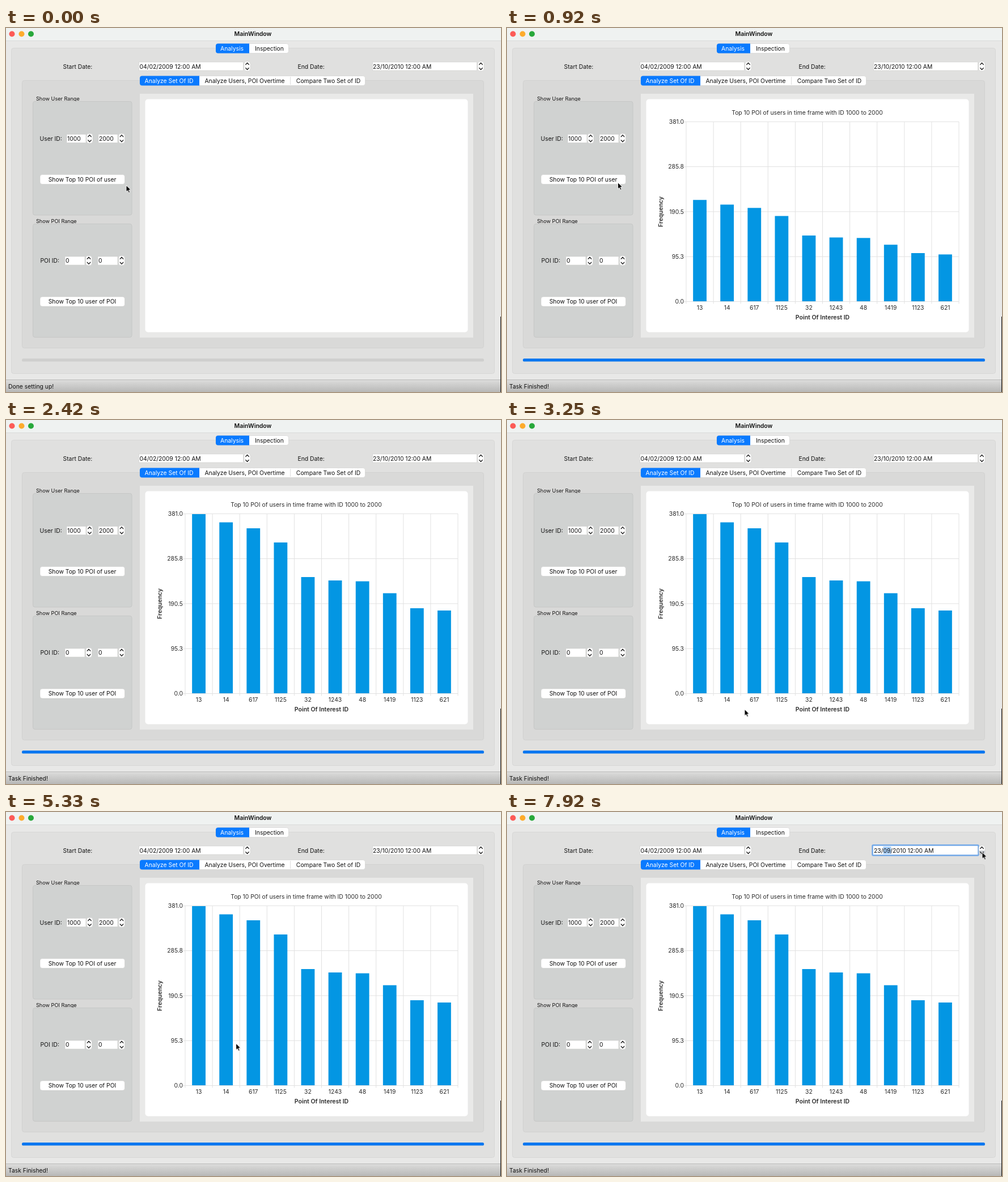
Write an HTML page that moves like this. It is 873 px wide and 642 px high and loops after 8000 ms.

```html
<!DOCTYPE html>
<html lang="en">
<head>
<meta charset="utf-8">
<title>MainWindow</title>
<style>
html, body { margin: 0; width: 100%; height: 100%; overflow: hidden; background: #e8e8e7; }
svg { display: block; width: 873px; height: 642px; }
text { font: 10.35px Inter, "Open Sans", sans-serif; fill: #111; white-space: pre; }
.bold { font-size: 10.5px; font-weight: 600; }
.small { font-size: 9.15px; }
.mid { text-anchor: middle; }
.end { text-anchor: end; }
.light { fill: #fff; }
.chart text { fill: #2b2b2b; }
.field { fill: #fff; stroke: #cbcbca; stroke-width: .6; }
.white { fill: #fff; stroke: #c4c4c3; stroke-width: .5; }
.blue { fill: #0a7aff; }
.group { fill: #d0d2d1; stroke: #c6c7c6; }
.bar { fill: #0396e3; }
.grid { stroke: #e1e1e1; fill: none; }
.chevron { fill: none; stroke: #222; stroke-width: 1.3; stroke-linecap: round; stroke-linejoin: round; }

/* Hard switches */
.idle, .work, .done, .press, .focus, .ibeam, .before, .after, .picked { animation: 8s step-end infinite; }
.idle { animation-name: idle; }
.work { animation-name: work; }
.done { animation-name: done; }
.press { animation-name: press; }
.focus { animation-name: focus; }
.ibeam { animation-name: ibeam; }
.before { animation-name: before; }
.after { animation-name: after; }
.picked { animation-name: picked; }
@keyframes idle { 0% { opacity: 1 } 5%, 100% { opacity: 0 } }
@keyframes work { 0% { opacity: 0 } 5% { opacity: 1 } 9.37%, 100% { opacity: 0 } }
@keyframes done { 0% { opacity: 0 } 9.37%, 100% { opacity: 1 } }
@keyframes press { 0% { opacity: 0 } 3.6% { opacity: 1 } 5.2%, 100% { opacity: 0 } }
@keyframes focus { 0% { opacity: 0 } 77%, 100% { opacity: 1 } }
@keyframes ibeam { 0% { opacity: 0 } 75% { opacity: 1 } 91.6%, 100% { opacity: 0 } }
@keyframes before { 0% { opacity: 1 } 98.95%, 100% { opacity: 0 } }
@keyframes after { 0% { opacity: 0 } 98.95%, 100% { opacity: 1 } }
@keyframes picked { 0% { opacity: 0 } 81.2% { opacity: 1 } 98.95%, 100% { opacity: 0 } }

/* Pointer paths */
.arrow { animation: arrow 8s linear infinite, arrowShown 8s step-end infinite; }
.beam { animation: beam 8s linear infinite; }
@keyframes arrowShown { 0% { opacity: 1 } 75% { opacity: 0 } 91.6%, 100% { opacity: 1 } }
@keyframes arrow {
  0%, 1% { transform: translate(211.5px, 277px) }
  3.5%, 12.5% { transform: translate(195px, 272px) }
  17.2%, 18% { transform: translate(381px, 182px) }
  19.7% { transform: translate(386px, 160px) }
  21.9%, 24% { transform: translate(400px, 95px) }
  26% { transform: translate(415px, -20px) }
  32.2% { transform: translate(560px, -20px) }
  32.25% { transform: translate(600px, 213px) }
  35.5% { transform: translate(724px, 400px) }
  37% { transform: translate(715px, 505px) }
  41.6% { transform: translate(340px, 511px) }
  44%, 51.5% { transform: translate(317px, 507px) }
  56%, 60.3% { transform: translate(334px, 502px) }
  61.5%, 64.6% { transform: translate(333px, 501px) }
  73.7% { transform: translate(655px, 84px) }
  75% { transform: translate(668px, 70px) }
  91.6% { transform: translate(833px, 73px) }
  94.5%, 95.8% { transform: translate(836px, 70px) }
  96.9%, 100% { transform: translate(837.5px, 70.5px) }
}
@keyframes beam {
  0%, 75% { transform: translate(668px, 70px) }
  76.5%, 85.4% { transform: translate(671.5px, 64.5px) }
  91.6%, 100% { transform: translate(833px, 70px) }
}
.bars { transform-origin: 0 482px; animation: grow 8s linear infinite; }
</style>
</head>
<body>
<svg viewBox="0 0 873 642">
  <defs>
    <linearGradient id="status" x2="0" y2="1">
      <stop stop-color="#dcdcdb"/><stop offset="1" stop-color="#b8b8b7"/>
    </linearGradient>
    <g id="stepper">
      <rect class="white" x="-5.5" y="-8.5" width="11" height="17" rx="4"/>
      <path class="chevron" d="M-2.8-3 0-6 2.8-3M-2.8 3 0 6 2.8 3"/>
    </g>
  </defs>

  <rect width="873" height="642" fill="#e8e8e7"/>
  <rect width="873" height="22" fill="#eff2f1"/>
  <path d="M0 22.5H873" stroke="#d9dad9"/>
  <circle cx="10.5" cy="10.5" r="5" fill="#fc5b57"/>
  <circle cx="27.5" cy="10.5" r="5" fill="#fdab2c"/>
  <circle cx="44" cy="10.5" r="5" fill="#28a83b"/>
  <text class="bold mid" x="435.5" y="14">MainWindow</text>

  <rect x="9.5" y="35.5" width="852" height="574" rx="4" fill="#e0e0df" stroke="#d7d7d6"/>
  <rect x="28.5" y="92.5" width="814" height="472" rx="4" fill="#d9d9d8" stroke="#d1d1d0"/>

  <rect class="white" x="370" y="27.5" width="128.5" height="17" rx="4"/>
  <path class="blue" d="M429 27.5V44.5H374a4 4 0 0 1-4-4v-9a4 4 0 0 1 4-4Z"/>
  <text class="mid light" x="398.5" y="40">Analysis</text>
  <text class="mid" x="464.5" y="40">Inspection</text>

  <rect class="white" x="236" y="84.5" width="397.5" height="17" rx="4"/>
  <path class="blue" d="M341 84.5V101.5H240a4 4 0 0 1-4-4v-9a4 4 0 0 1 4-4Z"/>
  <path d="M501.5 86V100" stroke="#dcdcdc"/>
  <text class="mid light" x="287.5" y="97">Analyze Set Of ID</text>
  <text class="mid" x="421" y="97">Analyze Users, POI Overtime</text>
  <text class="mid" x="568.5" y="97">Compare Two Set of ID</text>

  <text x="100.5" y="71.5">Start Date:</text>
  <rect class="field" x="234.5" y="60" width="184" height="15"/>
  <text x="235.5" y="71.5">04/02/2009 12:00 AM</text>
  <use href="#stepper" x="425.5" y="67.5"/>

  <text x="514.5" y="71.5">End Date:</text>
  <rect class="field" x="646.5" y="60" width="184" height="15"/>
  <rect class="focus" x="644.5" y="58.5" width="187" height="18" rx="1.5" fill="#fff" stroke="#72a8e8" stroke-width="2.5"/>
  <g fill="#a8cff8">
    <rect class="picked" x="663.5" y="61" width="12.5" height="13"/>
    <rect class="after" x="663.5" y="61" width="14" height="13"/>
  </g>
  <text class="before" x="647" y="71.5">23/10/2010 12:00 AM</text>
  <text class="after" x="647" y="71.5">23/09/2010 12:00 AM</text>
  <use href="#stepper" x="837.5" y="67.5"/>
  <g class="after">
    <path d="M832 68h11v4a4 4 0 0 1-4 4h-3a4 4 0 0 1-4-4Z" fill="#c9cdd2"/>
    <path class="chevron" d="M834.7 70.5l2.8 3 2.8-3"/>
  </g>

  <text class="small" x="53" y="127.8">Show User Range</text>
  <rect class="group" x="47.5" y="129.5" width="174.5" height="200.5" rx="3.5"/>
  <text x="59.5" y="198.7">User ID:</text>
  <rect class="field" x="107" y="187.5" width="34" height="15"/>
  <text x="108" y="198.7">1000</text>
  <use href="#stepper" x="147.5" y="194.8"/>
  <rect class="field" x="163" y="187.5" width="34" height="15"/>
  <text x="164" y="198.7">2000</text>
  <use href="#stepper" x="204" y="194.8"/>
  <rect class="white" x="60" y="258.5" width="149.5" height="17" rx="4"/>
  <rect class="press" x="60" y="258.5" width="149.5" height="17" rx="4" fill="#ececec"/>
  <text class="mid" x="134.5" y="270.5">Show Top 10 POI of user</text>

  <text class="small" x="53" y="343.5">Show POI Range</text>
  <rect class="group" x="47.5" y="345.5" width="174.5" height="200" rx="3.5"/>
  <text x="60.5" y="414.3">POI ID:</text>
  <rect class="field" x="104" y="403" width="35" height="15"/>
  <text x="105" y="414.3">0</text>
  <use href="#stepper" x="146" y="410.3"/>
  <rect class="field" x="162" y="403" width="35" height="15"/>
  <text x="163" y="414.3">0</text>
  <use href="#stepper" x="204" y="410.3"/>
  <rect class="white" x="60" y="474" width="149.5" height="17" rx="4"/>
  <text class="mid" x="134.5" y="486">Show Top 10 user of POI</text>

  <rect x="236" y="116" width="588" height="430" fill="#e9e9e8"/>
  <rect x="245.5" y="125.5" width="569" height="411" rx="5" fill="#fff"/>
  <g class="chart done">
    <text class="mid" x="529.5" y="153.3">Top 10 POI of users in time frame with ID 1000 to 2000</text>
    <g id="axes"></g>
    <g id="bars" class="bars"></g>
    <text class="bold mid" transform="translate(274.8 324) rotate(-90)">Frequency</text>
    <text class="bold mid" x="556.5" y="514.3">Point Of Interest ID</text>
  </g>

  <rect x="28" y="583" width="815" height="5.3" rx="2.6" fill="#cfcfce"/>
  <rect class="work" x="28" y="583" width="407.5" height="5.3" rx="2.6" fill="#0b77f0"/>
  <rect class="done" x="28" y="583" width="815" height="5.3" rx="2.6" fill="#0b77f0"/>

  <rect y="621" width="873" height="21" fill="url(#status)"/>
  <path d="M0 620.5H873" stroke="#b9b9b8"/>
  <text class="idle" x="4" y="636">Done setting up!</text>
  <text class="work" x="4" y="636">Task Started!</text>
  <text class="done" x="4" y="636">Task Finished!</text>
  <rect x="872" y="509" width="1" height="133" fill="#111"/>

  <g class="ibeam"><g class="beam" fill="none" stroke-linecap="round">
    <path id="caret" d="M-2.5-7.5Q0-7.5 0-5.5Q0-7.5 2.5-7.5M0-5.5V5.5M-2.5 7.5Q0 7.5 0 5.5Q0 7.5 2.5 7.5M-1.5 2.5H1.5" stroke="#fff" stroke-width="2"/>
    <use href="#caret" style="stroke:#111"/>
    <path d="M-2.5-7.5Q0-7.5 0-5.5Q0-7.5 2.5-7.5M0-5.5V5.5M-2.5 7.5Q0 7.5 0 5.5Q0 7.5 2.5 7.5M-1.5 2.5H1.5" stroke="#111"/>
  </g></g>
  <g class="arrow">
    <path d="M.5.5V12L3.2 9.6 5 13.7 7 12.8 5.2 8.8H8.8Z" fill="#000" stroke="#fff" stroke-width=".9" stroke-linejoin="round"/>
  </g>
</svg>
<script>
const left = 316, top0 = 165.3, base = 482.5, step = 48.1;
const labels = [13, 14, 617, 1125, 32, 1243, 48, 1419, 1123, 621];
const heights = [316, 301.5, 291, 266, 205, 199, 197.5, 176.5, 150, 146];
const ticks = ["381.0", "285.8", "190.5", "95.3", "0.0"];
const right = left + step * labels.length;

let axes = "";
for (let i = 0; i <= labels.length; i++) {
  const x = left + i * step;
  axes += `<path class="grid" d="M${x} ${top0}V${base + 4}"/>`;
}
ticks.forEach((tick, i) => {
  const y = top0 + i * (base - top0) / 4;
  axes += `<path class="grid" d="M${left - 4} ${y}H${right}"/>
    <text class="end" x="312" y="${y + 3.8}">${tick}</text>`;
});
let bars = "";
labels.forEach((label, i) => {
  const x = left + (i + .5) * step;
  axes += `<text class="mid" x="${x}" y="497">${label}</text>`;
  bars += `<rect class="bar" x="${x - 11.9}" y="${482 - heights[i]}" width="23.8" height="${heights[i]}"/>`;
});
document.getElementById("axes").innerHTML = axes;
document.getElementById("bars").innerHTML = bars;

// Quartic ease-out, sampled into keyframes
const start = 715, span = 1090, samples = 24;
let rules = "0%{transform:scaleY(0)}";
for (let i = 0; i <= samples; i++) {
  const p = i / samples;
  rules += `${((start + p * span) / 80).toFixed(3)}%{transform:scaleY(${(1 - (1 - p) ** 4).toFixed(4)})}`;
}
const sheet = document.createElement("style");
sheet.textContent = `@keyframes grow{${rules}100%{transform:scaleY(1)}}`;
document.head.append(sheet);
</script>
</body>
</html>
```
